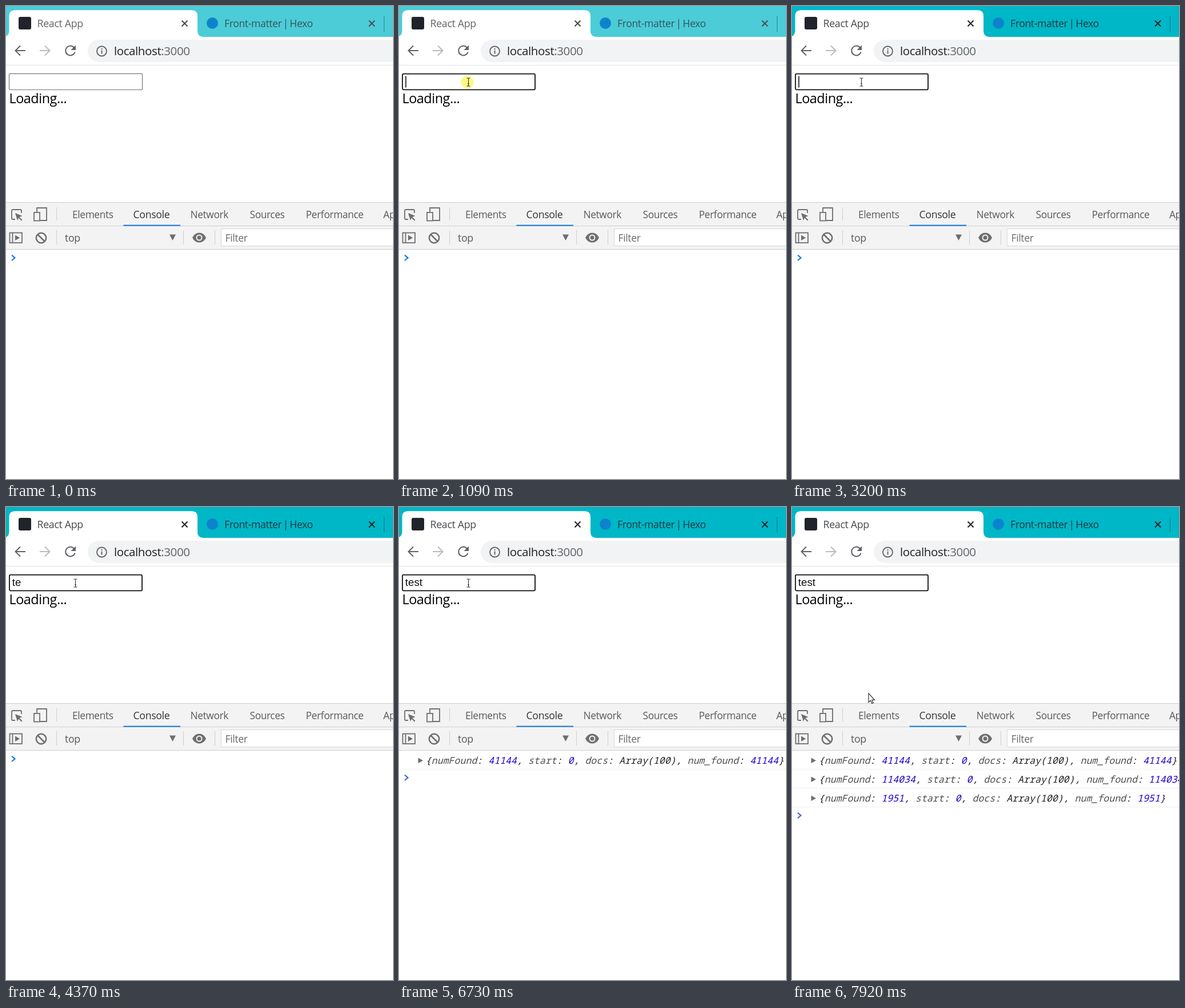
Write an HTML page that moves like this. It is 677 by 827 pixels and loops after 7990 ms.

```html
<!DOCTYPE html>
<html lang="en">
<head>
<meta charset="utf-8">
<title>Search demo</title>
<style>
  html, body { margin: 0; width: 100%; height: 100%; overflow: hidden; background: #fff; }
  svg { display: block; width: 677px; height: 827px; }
  text { white-space: pre; }
  .ui { font-family: "Open Sans", "Noto Sans", sans-serif; letter-spacing: -.02em; }
  .log { font: italic 16.58px "Noto Sans Mono", monospace; fill: #222; }
  .key { fill: #4e4e4e; }
  .num { fill: #1c00cf; }
  .line { fill: none; stroke: #5f6368; stroke-width: 2; }
  .rule { stroke: #cbced2; stroke-width: 1; }
</style>
</head>
<body>
<svg viewBox="0 0 677 827">
  <rect width="677" height="827" fill="#fff"/>

  <!-- tab strip -->
  <rect id="strip" width="677" height="54"/>
  <path d="M-6 54Q5.500 54 5.500 43V17.300Q5.500 7.300 15.500 7.300H325Q335 7.300 335 17.300V43Q335 54 346 54Z" fill="#fff"/>
  <rect x="22" y="19" width="22" height="22" rx="3" fill="#20232a"/>
  <circle cx="361" cy="30" r="10" fill="#0e83cd"/>
  <g class="ui">
    <text id="tab1" x="54.500" y="37" font-size="17.800">React App</text>
    <text id="tab2" y="37" font-size="17.500"><tspan x="382">Front-matter</tspan><tspan x="484.500">|</tspan><tspan x="496.300">Hexo</tspan></text>
  </g>
  <path id="closers" d="M307.500 25.500l10 10m0-10l-10 10M635 25.500l10 10m0-10l-10 10" fill="none" stroke-width="2"/>
  <path id="divider" d="M661.500 17V45" stroke-width="1.200"/>

  <!-- address bar -->
  <path class="line" d="M34 78H17M25 69.500L16.500 78L25 86.500"/>
  <path class="line" d="M59 78H76M68 69.500L76.500 78L68 86.500" style="stroke:#b9bbbe"/>
  <path class="line" d="M119.500 73.500A8.300 8.300 0 1 0 120.500 80.500"/>
  <path d="M122 68.500V77H113.500Z" fill="#5f6368"/>
  <rect x="143" y="59" width="600" height="39" rx="19.500" fill="#f1f3f4"/>
  <circle class="line" cx="167.500" cy="79" r="8.500" style="stroke-width:1.800"/>
  <path d="M166.600 77.500h1.900v6h-1.900zM166.600 74h1.900v2h-1.900z" fill="#5f6368"/>
  <text class="ui" x="189" y="85.700" font-size="20.500" fill="#202124">localhost<tspan fill="#5f6368">:3000</tspan></text>
  <path d="M0 103.500H677" stroke="#dfe1e4"/>

  <!-- page -->
  <rect id="box" fill="#fff"/>
  <text id="typed" x="10.800" y="138" font-size="18.700" fill="#111" font-family="Liberation Sans, Arial, sans-serif"></text>
  <rect id="caret" y="122.500" width="1.500" height="20" fill="#000"/>
  <text class="ui" x="5.500" y="170" font-size="23.400" fill="#000">Loading...</text>

  <!-- developer tools -->
  <rect y="343" width="677" height="83" fill="#f3f3f3"/>
  <path class="rule" d="M0 343.500H677M0 384.500H677M0 425.500H677M88.500 352V375M88.500 392V417M310.500 392V417M365.500 392V417"/>
  <rect x="205.500" y="382.600" width="99.500" height="2" fill="#1479d7"/>
  <g fill="none" stroke="#6e6e6e" stroke-width="1.800">
    <path d="M16 373H12Q10 373 10 371V358Q10 356 12 356H25Q27 356 27 358V362"/>
    <path d="M54 360V353H71V375H60"/>
    <rect x="49" y="361" width="10" height="14.500"/>
    <rect x="6.500" y="396.500" width="21.500" height="17.500"/>
    <path d="M11.500 396.500V414"/>
    <circle cx="61.500" cy="405.500" r="8.700" stroke-width="2.500"/>
    <path d="M55.500 399.500L67.500 411.500" stroke-width="2.500"/>
  </g>
  <g fill="#6e6e6e">
    <path d="M16 362L28.500 367L23.500 369L28.500 374L27 375.500L22 370.500L20 375Z"/>
    <path d="M16 400.500L24 405.300L16 410Z"/>
    <path d="M286 399.500H297L291.500 410Z"/>
    <path d="M326 405Q330 396.500 338 396.500T350 405Q346 413.500 338 413.500T326 405Z"/>
  </g>
  <circle cx="338" cy="405" r="4.500" fill="#6e6e6e" stroke="#f3f3f3" stroke-width="2"/>
  <rect x="376.500" y="389.500" width="310" height="30" fill="#fff" stroke="#d6d8db"/>
  <g class="ui" font-size="17.300" fill="#5a5a5a">
    <text x="116" y="371">Elements</text>
    <text x="222.500" y="371" font-size="17.700" fill="#333">Console</text>
    <text x="322.500" y="371">Network</text>
    <text x="426.500" y="371">Sources</text>
    <text x="524.500" y="371">Performance</text>
    <text x="660" y="371">Application</text>
    <text x="103" y="412" font-size="17.800">top</text>
    <text x="383.500" y="412" font-size="17.500" fill="#6a6a6a">Filter</text>
  </g>
  <g id="rows"></g>
  <path id="prompt" d="M10 435.500L15.500 440.300L10 445" fill="none" stroke-width="2.200"/>

  <!-- pointer -->
  <circle id="flash" cx="119.500" cy="133" r="11" fill="#fdf983"/>
  <path id="beam" d="M-3 -7H-1Q0 -7 0 -6Q0 -7 1 -7H3M0 -6V6M-3 7H-1Q0 7 0 6Q0 7 1 7H3M-1.500 3H1.500" fill="none" stroke="#333" stroke-width="1.100"/>
  <path id="arrow" d="M0 0V15.500L3.500 12.200L5.800 17.500L8.200 16.500L6 11.300H10.500Z" fill="#fff" stroke="#222" stroke-width="1.100"/>
</svg>
<script>
const LOOP = 7990, STEP = 70, ROW = 33;
const HOME = [121.5, 133], ENTRY = [647, 809], EXIT = [134, 326];
const keys = [[3580, "t"], [3820, "te"], [4440, "tes"], [4920, "test"]];
const caretX = [11.2, 15.4, 25.5, 35, 39.6];
const caretFlips = [1090, 1620, 2180, 2740, 3200, 4370, 4440, 5480, 6050, 6510, 7070, 7600];
const results = [[6730, 41144], [6880, 114034], [7710, 1951]];

const $ = id => document.getElementById(id);
const set = (id, attrs) => {
  for (const name in attrs) $(id).setAttribute(name, attrs[name]);
};
const show = (el, on) => el.setAttribute("visibility", on ? "visible" : "hidden");
const mix = (a, b, p) => a.map((v, i) => v + (b[i] - v) * p);
const smooth = p => p * p * (3 - 2 * p);

const key = s => `<tspan class="key">${s}</tspan>: `;
const num = n => `<tspan class="num">${n}</tspan>`;

$("rows").innerHTML = results.map(([, n], i) => `<g transform="translate(0 ${i * ROW})">
  <path d="M33.500 438.500L42 443.300L33.500 448Z" fill="#6e6e6e"/>
  <text class="log" x="46.800" y="449">{${key("numFound")}${num(n)}, ${key("start")}${num(0)}, ${key("docs")}Array(100), ${key("num_found")}${num(n)}}</text>
  <path d="M0 458.500H677" stroke="#efefef"/></g>`).join("");
const rows = [...$("rows").children];

function pointerAt(t) {
  if (t < 70) return null;
  if (t < 770) {
    const left = 1 - (Math.floor(t / STEP) - 1) / 10;
    return mix(HOME, ENTRY, left * left);
  }
  if (t < 7710) return HOME;
  const p = Math.min(1, (Math.floor((t - 7710) / STEP) + 1) / 4);
  return mix(HOME, EXIT, smooth(p));
}

function draw(t) {
  const active = t >= 1160, focus = t >= 1090, hover = t >= 770;
  set("strip", { fill: active ? "#00b7c7" : "#4bccd7" });
  set("tab1", { fill: active ? "#45494d" : "#626568" });
  set("tab2", { fill: active ? "#15393e" : "#34555a" });
  set("closers", { stroke: active ? "#222" : "#484c4e" });
  set("divider", { stroke: active ? "#087985" : "#328b94" });

  set("box", focus
    ? { x: 6, y: 118.7, width: 232, height: 27.6, rx: 2, stroke: "#101010", "stroke-width": 1.8 }
    : { x: 5.5, y: 118.3, width: 233, height: 28.2, rx: 2, stroke: hover ? "#4f4f4f" : "#767676", "stroke-width": 1.2 });

  const typed = keys.filter(k => t >= k[0]).length;
  $("typed").textContent = typed ? keys[typed - 1][1] : "";
  set("caret", { x: caretX[typed] });
  show($("caret"), caretFlips.filter(f => t >= f).length % 2);

  const shown = results.filter(r => t >= r[0]).length;
  rows.forEach((row, i) => show(row, i < shown));
  set("prompt", { transform: `translate(0 ${shown * ROW})`, stroke: shown ? "#4a62dc" : "#1a78e6" });

  const at = pointerAt(t);
  const inBox = at && at[0] < 239 && at[1] > 118 && at[1] < 147;
  show($("beam"), inBox);
  show($("arrow"), at && !inBox);
  show($("flash"), focus && !active);
  if (at) set(inBox ? "beam" : "arrow", { transform: `translate(${at})` });
}

const start = performance.now();
function tick() {
  draw((performance.now() - start) % LOOP);
  requestAnimationFrame(tick);
}
tick();
</script>
</body>
</html>
```
